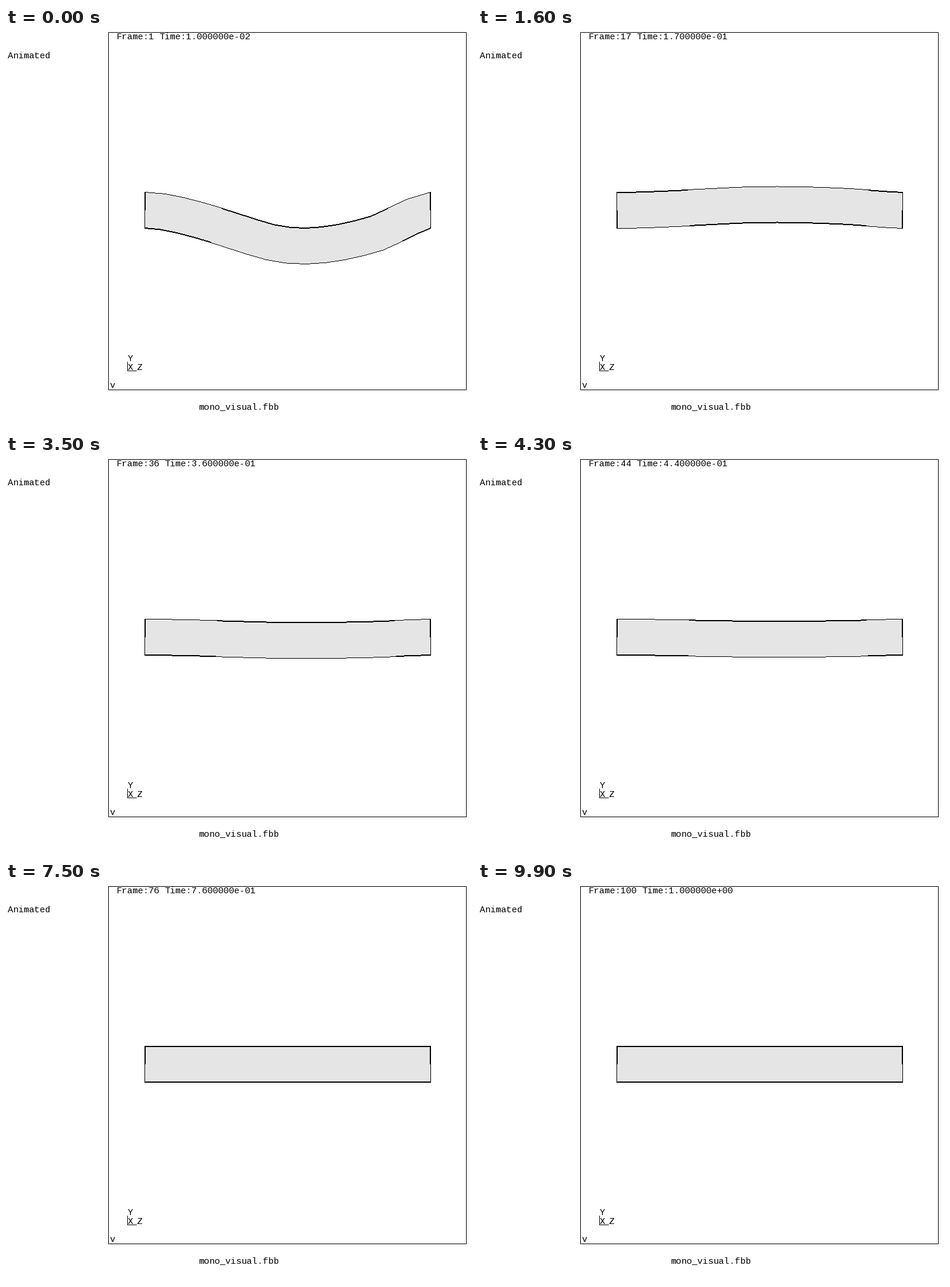
A matplotlib script that plays this animation: 784 px wide and 672 px high, repeating every 10000 ms.

```python
import numpy as np
import matplotlib.pyplot as plt
from matplotlib.animation import FuncAnimation

W, H, DPI = 784, 672, 100
FRAMES = 100
PX = 72 / DPI

plt.rcParams.update({
    "toolbar": "None",
    "font.family": "Liberation Mono",
    "text.hinting": "force_autohint",
    "text.hinting_factor": 1,
})

fig = plt.figure(figsize=(W / DPI, H / DPI), dpi=DPI, facecolor="white")
ax = fig.add_axes([0, 0, 1, 1])
ax.set_xlim(0, W)
ax.set_ylim(H, 0)
ax.axis("off")

# Beam at rest: 16 elements, held at both ends
LEFT, RIGHT, TOP, BOTTOM = 233.5, 714.5, 276.5, 337.5
MID, HALF = (TOP + BOTTOM) / 2, (BOTTOM - TOP) / 2
NODES = np.linspace(LEFT, RIGHT, 17)
COLUMNS = np.arange(int(LEFT), int(RIGHT) + 1)
SHAPE = np.array([0, 2.6, 8.7, 16.5, 25.4, 35, 44.7, 53.5, 58.6,
                  60, 58, 53.5, 46.8, 38.3, 24.5, 10.3, 0]) / 60
BEND_FROM, BEND_TO = 4, 14


def line(xs, ys):
    ax.plot(xs, ys, color="black", lw=PX, solid_capstyle="projecting",
            solid_joinstyle="miter")


def label(x, baseline, text):
    return ax.text(x, baseline, text, size=15 * PX, color="black",
                   va="baseline", ha="left")


def area(color):
    return ax.fill([0, 1, 1], [0, 0, 1], fc=color, ec="none", lw=0,
                   snap=False)[0]


def deflection(t):
    """Decaying vibration whose frequency settles as it gets smaller."""
    u = t - 0.01
    phase = 0.3 + (14 * np.pi - 0.3) * np.exp(-20.07 * u)
    return 60 * np.exp(-6.8 * u) * np.cos(phase)


def beam_edges(d):
    w = d * SHAPE
    angle = np.arctan(np.gradient(w, NODES))
    angle[[0, -1]] = 0
    angle[1:-1] = np.convolve(angle, [0.25, 0.5, 0.25], "valid")
    dx, dy = HALF * np.sin(angle), HALF * np.cos(angle)
    return (NODES + dx, MID + w - dy), (NODES - dx, MID + w + dy)


def rows(edge):
    """Pixel row of an edge in every column."""
    return np.floor(np.interp(COLUMNS + 0.5, *edge) + 1e-6)


def bent(edge):
    """Columns of the middle part, between the points of inflection."""
    x = edge[0]
    return (COLUMNS >= x[BEND_FROM]) & (COLUMNS <= x[BEND_TO])


def staircase(columns, upper, lower):
    """Whole-pixel polygon from row `upper` down to row `lower`."""
    xs = np.column_stack([columns, columns + 1]).ravel()
    up, low = np.repeat(upper, 2), np.repeat(lower, 2)
    return np.column_stack([np.r_[xs, xs[::-1]], np.r_[up, low[::-1]]])


def block(x, y0, y1):
    return [(x, y0), (x + 1, y0), (x + 1, y1), (x, y1)]


# Static parts
line([172.5, 774.5, 774.5, 172.5, 172.5], [6.5, 6.5, 608.5, 608.5, 6.5])
line([204.5, 204.5, 219.5], [561.5, 576.5, 576.5])
label(3, 51, "Animated")
label(324, 642, "mono_visual.fbb")
label(205, 561, "Y")
label(205, 576, "X")
label(220, 576, "Z")
label(175, 606, "v")

# Moving parts
caption = label(186, 19, "")
outline, body = area("black"), area("#e5e5e5")
left_bold, right_bold = area("black"), area("black")


def update(i):
    t = (i + 1) / 100
    d = deflection(t)
    top_edge, bottom_edge = beam_edges(d)
    top, bottom = rows(top_edge), rows(bottom_edge)

    # Double-width runs swap between the edges with the bending direction
    if abs(d) < 0.6:
        top_bold = bottom_bold = np.ones_like(COLUMNS, dtype=bool)
    elif d > 0:
        top_bold, bottom_bold = bent(top_edge), ~bent(bottom_edge)
    else:
        top_bold, bottom_bold = ~bent(top_edge), bent(bottom_edge)

    outline.set_xy(staircase(COLUMNS, top, bottom + 1))
    inside = slice(1, -1)
    body.set_xy(staircase(COLUMNS[inside], (top + 1 + top_bold)[inside],
                          (bottom - bottom_bold)[inside]))

    side = (277, 307) if d > 0 else (307, 337)
    left_bold.set_xy(block(COLUMNS[0] + 1, *side))
    right_bold.set_xy(block(COLUMNS[-1] - 1, *side))

    caption.set_text(f"Frame:{i + 1} Time:{t:.6e}")
    return outline, body, left_bold, right_bold, caption


anim = FuncAnimation(fig, update, frames=FRAMES, interval=100,
                     repeat=True, repeat_delay=0, blit=False)
plt.show()
```
